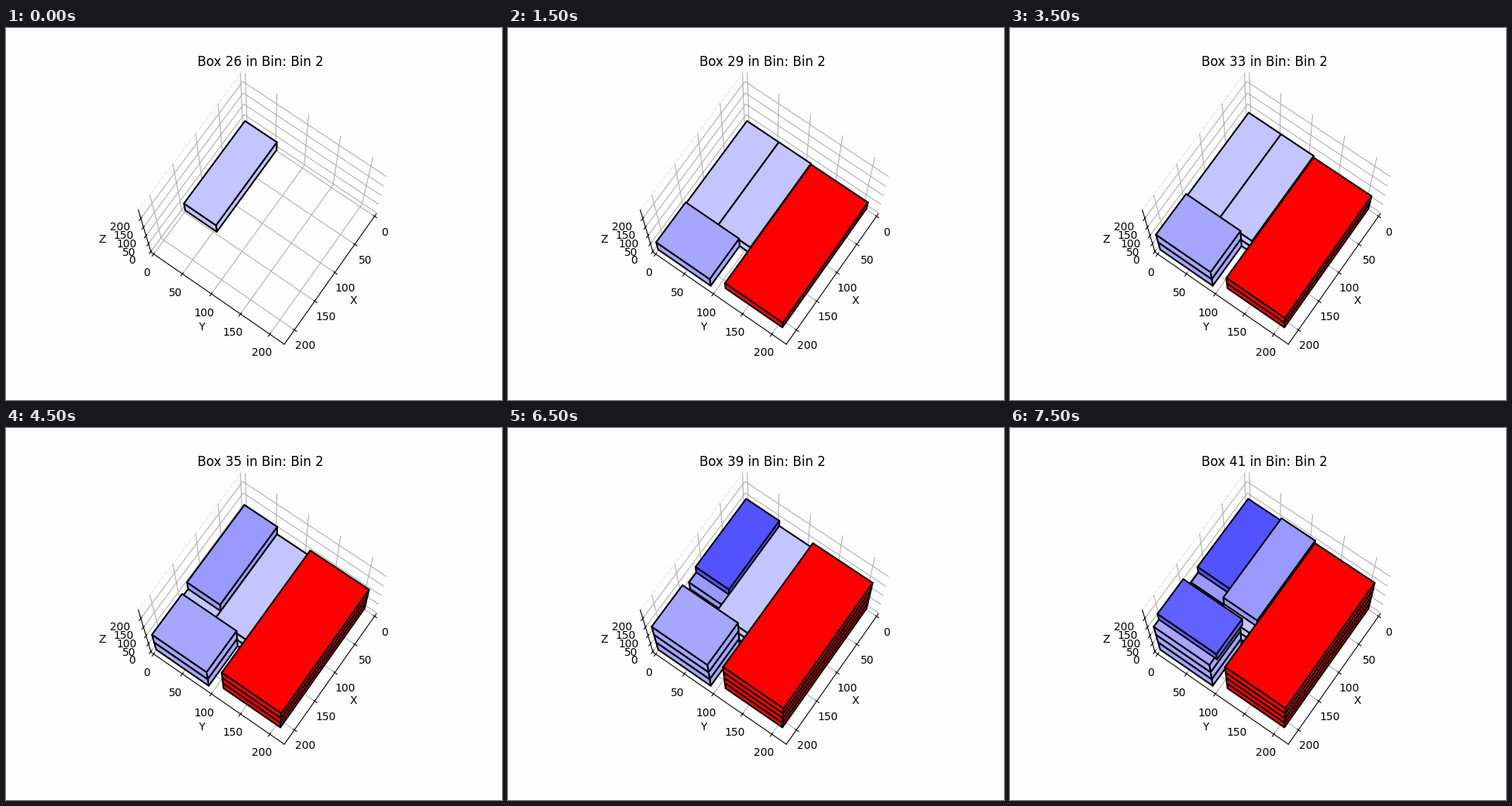
These frames come from a looping animation (640 by 480 pixels, 8 s). A matplotlib script:

```python
import matplotlib.pyplot as plt
from matplotlib.animation import FuncAnimation
from mpl_toolkits.mplot3d.art3d import Poly3DCollection

FIRST = 26
SIZE = (220, 220, 240)
BG = "#fdfdfd"


def blue(level):
    return (level / 255, level / 255, 1)


PALE, SOFT, MID, DEEP, STRONG = map(blue, (196, 166, 153, 97, 82))
RED = (1, 0, 0)

# Stacks from back to front: base corner, then (dx, dy, dz, colour) upwards.
STACKS = {
    "back": ((0, 0), [(148, 55, 40, PALE)] * 2
             + [(135, 55, 36, MID), (118, 55, 28, STRONG)]),
    "middle": ((0, 55), [(148, 55, 40, PALE)] * 3 + [(135, 55, 36, MID)]),
    "front": ((148, 0), [(70, 91, 47, SOFT)] * 3 + [(58, 95, 32, DEEP)]),
    "right": ((0, 110), [(209, 97, 36, RED)] * 4),
}
ORDER = (["back", "front", "middle", "right", "right"]
         + ["back", "middle", "front", "right"] * 2
         + ["back", "middle", "front"])


def visible_faces(x, y, z, dx, dy, dz):
    """Top, +x and +y sides: the only ones seen from this viewpoint."""
    X, Y, Z = x + dx, y + dy, z + dz
    return [
        [(X, y, z), (X, Y, z), (X, Y, Z), (X, y, Z)],
        [(x, Y, z), (X, Y, z), (X, Y, Z), (x, Y, Z)],
        [(x, y, Z), (X, y, Z), (X, Y, Z), (x, Y, Z)],
    ]


fig = plt.figure(figsize=(6.4, 4.8), dpi=100, facecolor=BG)
ax = fig.add_subplot(projection="3d", computed_zorder=False)
ax.set_facecolor(BG)
ax.set_box_aspect((1, 1, 1))
ax.view_init(elev=75, azim=35)
for name, size in zip("xyz", SIZE):
    pad = size / 48
    ax.set(**{f"{name}lim": (-pad, size + pad), f"{name}label": name.upper()})
for axis in (ax.xaxis, ax.yaxis, ax.zaxis):
    axis.pane.set(fill=False, edgecolor="none")
ax.yaxis.pane.set(alpha=1, edgecolor="#e8e8e8", linestyle="--")
title = ax.set_title("")


def build_boxes():
    pools = {}
    for rank, (key, (base, layers)) in enumerate(STACKS.items()):
        z, pools[key] = 0, []
        for level, (dx, dy, dz, color) in enumerate(layers):
            box = Poly3DCollection(
                visible_faces(*base, z, dx, dy, dz), facecolors=color,
                edgecolors="black", linewidths=1.5,
                zorder=10 + 10 * rank + level)
            ax.add_collection3d(box)
            pools[key].append(box)
            z += dz
    return [pools[key].pop(0) for key in ORDER]


boxes = build_boxes()


def update(i):
    for n, box in enumerate(boxes):
        box.set_visible(n <= i)
    title.set_text(f"Box {FIRST + i} in Bin: Bin 2")
    return [title, *boxes]


anim = FuncAnimation(fig, update, frames=len(boxes), interval=500,
                     repeat=True, blit=False)
plt.show()
```
